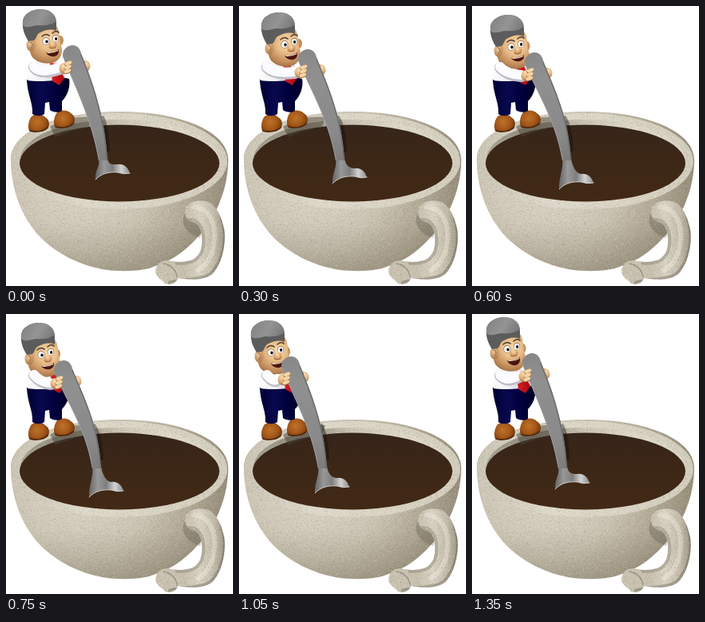
Write an HTML page with a canvas that moves like this. It is 284 px wide and 350 px high and loops after 1.5 s.

```html
<!DOCTYPE html>
<html lang="en">
<head>
<meta charset="utf-8">
<title>Stirring the coffee</title>
<style>
html, body { margin: 0; width: 100%; height: 100%; overflow: hidden; background: #fff; }
canvas { display: block; width: 284px; height: 350px; }
</style>
</head>
<body>
<canvas id="stage" width="284" height="350"></canvas>
<script>
const W = 284, H = 350, STEP = 150, NECK = 193;
const stage = document.getElementById('stage').getContext('2d');
let g = stage;

// spoon top x, y, bowl tip x, y, head x, y, mouth opening, face turn
const poses = [
  [84, 49, 112, 217, 20, 4, 3, 4],
  [88, 51, 117, 216, 24, 6, 4, 5],
  [87, 54, 117, 222, 27, 8, 3, 4],
  [83, 56, 114, 227, 26, 9, 3, 3],
  [79, 58, 109, 229, 22, 11, 2, 1],
  [73, 58, 104, 229, 18, 11, 2, 0],
  [68, 56, 97, 226, 15, 11, 2, 0],
  [66, 53, 95, 224, 14, 8, 3, 0],
  [68, 51, 97, 221, 15, 5, 4, 0],
  [76, 49, 104, 219, 17, 4, 4, 1]
];

function fill(d, color) {
  g.fillStyle = color;
  g.fill(new Path2D(d));
}
function line(d, color, width) {
  g.strokeStyle = color;
  g.lineWidth = width;
  g.lineCap = g.lineJoin = 'round';
  g.stroke(new Path2D(d));
}
function oval(x, y, rx, ry, color, turn = 0) {
  g.beginPath();
  g.ellipse(x, y, rx, ry, turn, 0, 7);
  g.fillStyle = color;
  g.fill();
}
function shade(grad, colors) {
  colors.forEach((c, i) => grad.addColorStop(i / (colors.length - 1), c));
  return grad;
}
const linear = (x0, y0, x1, y1, ...c) => shade(g.createLinearGradient(x0, y0, x1, y1), c);
const radial = (x, y, r, ...c) => shade(g.createRadialGradient(x, y, 0, x, y, r), c);

function speckle(path, count, x, y, w, h) {
  let seed = 77;
  const rnd = () => (seed = (seed * 16807) % 2147483647) / 2147483647;
  g.save();
  g.clip(path);
  for (let i = 0; i < count; i++) {
    g.fillStyle = rnd() < 0.5 ? 'rgba(110,102,86,.15)' : 'rgba(255,250,235,.15)';
    g.fillRect(x + Math.floor(rnd() * w), y + Math.floor(rnd() * h), 1, 1);
  }
  g.restore();
}

function drawCup() {
  const body = 'M6 192C6 157 63 132 142 132S278 158 278 192C278 232 260 269 237 292C221 309 207 318 187 325C171 332 146 332 127 330C92 325 61 308 42 288C18 263 6 226 6 192Z';
  fill(body, radial(92, 208, 195, '#dbd5c7', '#d5cebf', '#c9c1b0', '#aea692', '#8d8570'));
  fill(body, linear(0, 270, 0, 334, 'rgba(100,92,74,0)', 'rgba(100,92,74,.26)'));

  // rim and inner wall
  oval(142, 194, 135, 60, linear(7, 0, 277, 0, '#cbc5b6', '#ded8ca', '#d9d3c4', '#d2ccbd'));
  fill('M18 190C23 161 74 142 142 142S261 161 267 190C252 165 205 150 142 150S34 165 18 190Z',
    linear(18, 0, 267, 0, '#a8a294', '#8f897b', '#cdc6b5', '#ddd7c7', '#d9d3c3'));
  speckle(new Path2D(body), 15000, 6, 132, 272, 200);
  oval(142, 196.5, 125, 48, linear(0, 149, 0, 245, '#36251a', '#3d2716', '#412916'));

  // shadow of the feet
  fill('M55 151C70 141 92 137 108 139L104 151C90 153 75 158 62 164Z', 'rgba(75,68,56,.5)');

  const handle = 'M224 257C224 246 237 242 249 244C262 246 269 261 273 279C276 299 269 325 258 335C247 344 228 342 215 340C213 347 205 349 199 347C196 342 188 340 187 332C187 324 193 318 202 318C212 320 221 321 231 318C243 314 246 302 245 289C244 278 240 271 232 270C226 267 224 263 224 257Z';
  fill('M224 259C217 271 224 283 243 290L246 276L233 265Z', 'rgba(90,82,68,.3)');
  fill(handle, linear(226, 0, 276, 0, '#c8c1b0', '#d8d2c3', '#c3bcab', '#9b9381'));
  g.save();
  g.clip(new Path2D(handle));
  line('M226 268C240 265 247 277 247 294C247 314 234 323 214 321', 'rgba(100,92,78,.3)', 5);
  line('M270 265C281 297 268 324 255 336C241 344 222 341 205 346', 'rgba(85,78,66,.36)', 5);
  line('M235 251C252 252 261 268 261 286C261 306 254 323 240 330', 'rgba(242,238,226,.4)', 6);
  g.restore();
  line('M197 322C206 323 213 330 214 339', 'rgba(90,82,70,.45)', 1.3);
  speckle(new Path2D(handle), 2700, 186, 242, 90, 106);
}

function drawShoe(x, y) {
  g.save();
  g.translate(x, y);
  fill('M4 4C9 0 18 1 21 5C26 8 27 13 25 18C20 24 7 25 1 22C-1 17 0 9 4 4Z',
    radial(11, 11, 18, '#bd7228', '#a5581a', '#5c2d08'));
  line('M2 22C9 24 19 23 24 18', '#4a2207', 1.5);
  g.restore();
}

function drawBody() {
  drawShoe(28, 134);
  drawShoe(60, 129);
  fill('M26 92C40 89 66 87 79 91C81 102 76 113 70 119L70 131C66 134 59 133 55 130L54 120L49 121L48 135C44 138 37 138 33 135C34 121 27 112 26 92Z',
    linear(26, 0, 80, 0, '#000030', '#08084e', '#00003c', '#000022'));
  fill('M29 69C40 64 60 66 69 73L74 90C62 94 40 95 27 93C25 85 25 75 29 69Z',
    linear(27, 70, 74, 92, '#ffffff', '#f2f2f4', '#c4c4cc'));
  fill('M55 71L63 72L73 90L67 99L58 94Z', linear(55, 0, 73, 0, '#dc2226', '#a8070e'));
}

function drawFeatures(open, asleep) {
  line('M21 34Q25 30 30 33M34 30Q38 26 42 29', '#55483c', 1.7);
  if (asleep) {
    line('M22 40Q26 43 31 40M35 37Q38 40 42 37', '#70401f', 1.3);
  } else {
    oval(26, 40, 4.5, 4.8, '#8c6442');
    oval(38, 36.5, 4, 4.6, '#8c6442');
    oval(26, 40.2, 3.8, 4.1, '#fff');
    oval(38, 36.7, 3.4, 3.9, '#fff');
    oval(27, 40.4, 1.7, 2, '#111');
    oval(38.6, 37, 1.6, 1.9, '#111');
  }
  oval(34.5, 45, 5, 4.3, radial(34, 43, 6, '#fbdcb0', '#e5b27c', '#b98454'), -0.2);
  line('M30 48Q33 50 38 48', '#96653c', 0.9);
  fill(`M26 54Q34 55 42 50Q43 ${54 + open} 37 ${56 + open}Q29 ${57 + open} 26 54Z`, '#4a1613');
  line('M28 54.5Q35 55 41 51.5', '#f0dcc8', 1.1);
}

function drawHead(x, y, open, turn, asleep) {
  g.save();
  g.translate(x, y);
  oval(46 + turn / 2, 39, 4, 6, '#c29062');
  fill('M9 23C18 17 36 17 44 22C47 28 47 34 48 43C52 51 50 60 43 65C34 70 20 68 13 60C8 53 7 35 9 23Z',
    radial(33, 38, 36, '#f6d6a8', '#eabf8b', '#c38e5c', '#875c37'));
  oval(11, 45, 5.5, 7.5, radial(10, 43, 9, '#eec596', '#ad7a4c'));
  line('M10 41C14 42 14 46 11 49', '#8d6038', 1);

  // hair
  fill('M1 15C2 6 12 0 24 0C36 1 43 8 43 18L43 27C36 24 28 26 21 30C18 32 18 37 15 39L8 40C3 32 0 24 1 15Z', '#5c5c5c');
  fill('M1 15C3 6 12 0 24 0C35 0 42 6 43 15C36 20 27 21 19 20C11 22 4 24 1 20Z',
    linear(5, 2, 40, 22, '#848484', '#949494', '#767676'));

  g.translate(turn, 0);
  drawFeatures(open, asleep);
  g.restore();
}

function drawShadow(x, bx) {
  const nx = bx + 9;
  fill(`M${x + 30} 140L${x + 38} 137Q${nx + 8} 150 ${nx + 9} 182L${nx} 182Z`, 'rgba(18,12,9,.4)');
}

function drawSpoon(x, y, bx, by) {
  const nx = bx + 9, rx = bx + 43, ry = by - 8;
  const bowl = `M${nx - 5} ${NECK - 3}C${nx - 3} ${NECK + 10} ${bx - 1} ${by - 13} ${bx} ${by}` +
    `C${bx + 7} ${by - 8} ${bx + 18} ${by - 10} ${bx + 28} ${by - 9}Q${bx + 35} ${by - 6} ${rx} ${ry}` +
    `C${bx + 40} ${by - 17} ${bx + 34} ${by - 20} ${bx + 28} ${by - 19}` +
    `C${nx + 12} ${by - 19} ${nx + 7} ${NECK + 6} ${nx + 6} ${NECK - 3}Z`;
  fill(bowl, linear(bx, by - 12, rx, by - 12, '#666666', '#989898', '#7e7e7e', '#d2d2d2', '#8a8a8a'));
  line(`M${bx} ${by}C${bx + 7} ${by - 8} ${bx + 18} ${by - 10} ${bx + 28} ${by - 9}Q${bx + 35} ${by - 6} ${rx} ${ry}`, '#d0d0d0', 1);

  const left = `C${nx - 14} 140 ${x - 1} ${y + 45} ${x - 13} ${y + 14}`;
  const right = `C${x + 24} ${y + 45} ${nx + 3} 138 ${nx + 6} ${NECK}`;
  const handle = `M${x - 13} ${y + 14}C${x - 14} ${y + 5} ${x - 6} ${y} ${x - 1} ${y}` +
    `C${x + 6} ${y} ${x + 9} ${y + 5} ${x + 11} ${y + 13}` + right +
    `L${nx - 5} ${NECK}` + left + 'Z';
  fill(handle, linear(x, y, nx, NECK, '#888888', '#909090', '#8c8c8c', '#8a8a8a', '#7c7c7c'));
  g.save();
  g.clip(new Path2D(handle));
  line(`M${x + 11} ${y + 13}` + right, '#6e6e6e', 3);
  line(`M${nx - 5} ${NECK}` + left, '#a0a0a0', 1.6);
  g.restore();
}

function drawHand(x, y, side) {
  g.save();
  g.translate(x, y);
  g.scale(side, 1);
  oval(0, 1, 6.5, 7, radial(-1, -2, 10, '#f8dcb0', '#e5b683', '#a8754a'));
  for (let i = 0; i < 3; i++) {
    oval(5 - i * 0.6, -5 + i * 5, 5, 2.7, '#9b6e45', -0.35);
    oval(5 - i * 0.6, -5.7 + i * 5, 4.6, 2.3, '#f5d4a4', -0.35);
  }
  g.restore();
}

function drawArm(x, y) {
  line(`M35 77Q43 87 ${x - 5} ${y + 2}`, '#c0c0c8', 14);
  line(`M35 76Q43 85 ${x - 6} ${y}`, '#fcfcfe', 12);
}

const cup = document.createElement('canvas');
cup.width = W;
cup.height = H;
g = cup.getContext('2d');
drawCup();
g = stage;

function draw(time) {
  const step = Math.floor(time / STEP) % poses.length;
  const [x, y, bx, by, hx, hy, open, turn] = poses[step];
  g.fillStyle = '#fff';
  g.fillRect(0, 0, W, H);
  g.drawImage(cup, 0, 0);
  drawShadow(x, bx);
  drawBody();
  drawHead(hx, hy, open, turn, step === 1);
  drawArm(x - 12, y + 28);
  drawHand(x + 15, y + 25, -1);
  drawSpoon(x, y, bx, by);
  drawHand(x - 11, y + 28, 1);
}

const start = performance.now();
function tick() {
  draw(performance.now() - start);
  requestAnimationFrame(tick);
}
tick();
</script>
</body>
</html>
```
